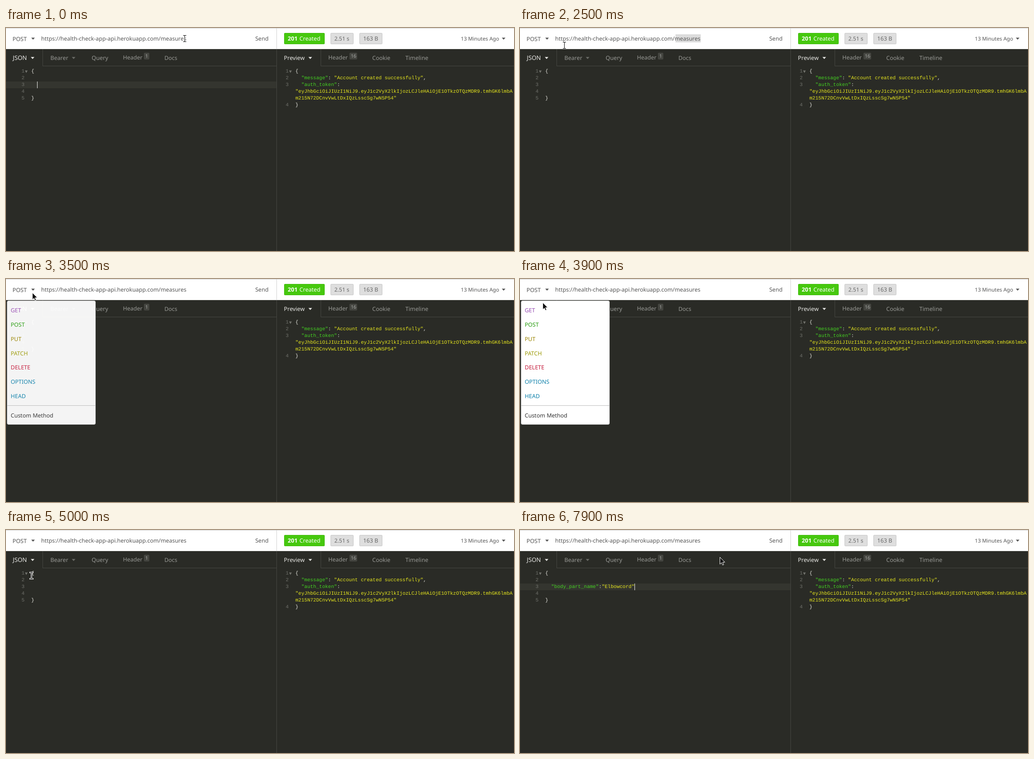
An HTML page with a canvas that plays this animation: 1127 by 496 pixels, repeating every 8 s.

```html
<!DOCTYPE html>
<html lang="en">
<head>
<meta charset="utf-8">
<title>API client</title>
<style>
html, body { margin: 0; width: 100%; height: 100%; overflow: hidden; background: #2a2b26; }
canvas { display: block; }
</style>
</head>
<body>
<canvas width="1127" height="496"></canvas>
<script>
const ctx = document.querySelector("canvas").getContext("2d");
ctx.textRendering = "geometricPrecision";

const SANS = '"Noto Sans", "Open Sans", sans-serif';
const MONO = '"Liberation Mono", "DejaVu Sans Mono", monospace';
const CHAR = 6.6, LOOP = 8000;
const BG = "#2a2b26", LINE = "#464742", GREY = "#999a96", LIGHT = "#e9e9e6", INK = "#555";
const KEY = "#44d022", STR = "#e6e61e", CODE = "#e6e6e0", NUM = "#70716b";

// Pointer positions: time, x, y, shape ("I" text beam, "A" arrow)
const pointer = [
  [0, 396, 23, "I"], [400, 405, 28, "I"], [1500, 394, 25, "I"], [1600, 374, 22, "I"],
  [1700, 362, 22, "I"], [1800, 353, 22, "I"], [2000, 345, 19, "I"],
  [2200, 328, 22, "I"], [2300, 260, 29, "I"], [2400, 170, 35, "I"],
  [2500, 98, 38, "I"], [2600, 62, 46, "A"], [2700, 64, 39, "A"], [2900, 58, 30, "A"],
  [3800, 56, 38, "A"], [3900, 50, 52, "A"], [4000, 46, 66, "A"], [4200, 43, 96, "A"],
  [4600, 43, 95, "I"], [5000, 56, 101, "I"], [5100, 80, 112, "I"], [5200, 100, 122, "I"],
  [5300, 108, 127, "I"], [7600, 291, 114, "I"], [7800, 400, 67, "A"], [7900, 443, 60, "A"]
];
// Left edge of the selection in the address: time, x
const selection = [[0, 401], [1500, 389], [1600, 376], [1700, 363], [1800, 345], [3200, 401]];

const methods = [
  ["GET", "#9347b0", 74], ["POST", "#259b0c", 106], ["PUT", "#9a8500", 138],
  ["PATCH", "#9c9a06", 170], ["DELETE", "#c4193a", 201], ["OPTIONS", "#0d80aa", 233],
  ["HEAD", "#0d80aa", 265], ["Custom Method", "#333", 308]
];

const at = (keys, t) => keys.findLast(k => k[0] <= t);
const within = (t, ...spans) => spans.some(([a, b]) => t >= a && t < b);

function rect(x, y, w, h, color) {
  ctx.fillStyle = color;
  ctx.fillRect(x, y, w, h);
}

function box(x, y, w, h, r, fill, stroke) {
  ctx.beginPath();
  ctx.roundRect(x, y, w, h, r);
  ctx.fillStyle = fill;
  ctx.fill();
  if (!stroke) return;
  ctx.strokeStyle = stroke;
  ctx.lineWidth = 1;
  ctx.stroke();
}

function text(s, x, y, color, size = 12.5, weight = 400) {
  ctx.font = `${weight} ${size}px ${SANS}`;
  ctx.fillStyle = color;
  ctx.fillText(s, x, y);
}

// Monospaced runs, given as string and colour in turn
function code(x, row, ...runs) {
  ctx.font = `11px ${MONO}`;
  for (let i = 0; i < runs.length; i += 2) {
    ctx.fillStyle = runs[i + 1];
    ctx.fillText(runs[i], x, 99 + row * 15);
    x += runs[i].length * CHAR;
  }
}

function poly(points, color) {
  ctx.beginPath();
  points.forEach(([x, y]) => ctx.lineTo(x, y));
  ctx.closePath();
  ctx.fillStyle = color;
  ctx.fill();
}

const drop = (x, y, color, w = 8, h = 4.5) => poly([[x, y], [x + w, y], [x + w / 2, y + h]], color);

function gutter(right, rows) {
  rows.forEach((row, i) => code(right - CHAR, row, String(i + 1), NUM));
  drop(right + 1, 94.5, "#73746e", 6, 5.5);
}

function badge(s, x, w) {
  box(x, 55, w, 15, 2, "#444540");
  text(s, x + 3, 66, "#aaaba7", 10.5);
}

function header(t) {
  rect(0, 0, 1127, 47, "#fff");
  rect(0, 0, 1127, 1, "#cfcfcf");
  rect(0, 46, 1127, 1, "#e4e4e3");
  if (within(t, [2600, 3500])) rect(0, 1, 75, 45, "#f0f0f0");
  text("POST", 14.5, 29, INK, 12.7);
  drop(56, 21.5, INK);

  const [, left] = at(selection, t);
  rect(left, 14, 401 - left, 18, "#dcdcdc");
  text("https://health-check-app-api.herokuapp.com/measures", 78, 28, INK, 12.43);
  if (within(t, [700, 1200])) rect(401, 14, 1, 18, "#333");
  if (within(t, [3200, 3400])) rect(78, 14, 1, 18, "#333");
  text("Send", 553, 28, INK);

  rect(600, 0, 1, 47, "#cfcfcf");
  box(617.5, 11.5, 89, 24, 1, "#46c80e", "#3fb90b");
  text("201", 625, 28, "#fff", 12.7, 700);
  text("Created", 651, 28, "#fff", 12.6);
  box(720.5, 11.5, 50, 24, 1, "#dedede", "#c6c6c6");
  text("2.51 s", 728.5, 28, "#666", 12.2);
  box(784.5, 11.5, 50, 24, 1, "#dedede", "#c6c6c6");
  text("163 B", 792.5, 28, "#666", 12.6);
  text("13 Minutes Ago", 1009, 28, INK, 11.6);
  drop(1100, 21.5, INK);
}

function tabs() {
  rect(600, 47, 1, 449, LINE);
  rect(81, 47, 1, 38, LINE);
  rect(81, 84, 519, 1, LINE);
  rect(698, 47, 1, 38, LINE);
  rect(698, 84, 429, 1, LINE);

  text("JSON", 15, 71, LIGHT, 13.3);
  drop(55, 64.5, LIGHT);
  text("Bearer", 98.5, 71, GREY, 12.6);
  drop(146, 64.5, "#6c6d68");
  text("Query", 190, 71, GREY, 12.7);
  text("Header", 259.5, 70, GREY);
  badge("1", 306, 12);
  text("Docs", 351.5, 71, GREY, 12.4);

  text("Preview", 616.5, 71, LIGHT, 12.7);
  drop(671, 64.5, LIGHT);
  text("Header", 715, 70, GREY);
  badge("16", 762, 17);
  text("Cookie", 812.5, 71, GREY);
  text("Timeline", 886, 71, GREY, 12.7);
}

function editor(t) {
  if (within(t, [0, 400], [5300, 5500], [6500, LOOP])) rect(0, 119, 600, 15, "#34352f");
  if (within(t, [5500, 6500])) rect(56, 119, 13, 15, "#4b4c46");
  gutter(41, [0, 1, 2, 3, 4]);
  code(56, 0, "{", CODE);
  if (t >= 6800) code(69.2, 2, '"body_part_name"', KEY, ":", CODE, '"Elbowcord"', STR);
  code(56, 4, "}", CODE);
  if (within(t, [0, 200], [5300, 5500], [6500, 6800])) rect(69, 119, 1, 15, "#f4f4f0");
  if (within(t, [6800, 7300], [7800, LOOP])) rect(254, 119, 1, 15, "#f4f4f0");
}

function response() {
  gutter(627, [0, 1, 2, 5]);
  code(642, 0, "{", CODE);
  code(655.2, 1, '"message"', KEY, ": ", CODE, '"Account created successfully"', STR, ",", CODE);
  code(655.2, 2, '"auth_token"', KEY, ":", CODE);
  code(642, 3, '"eyJhbGciOiJIUzI1NiJ9.eyJ1c2VyX2lkIjozLCJleHAiOjE1OTkzOTQzMDR9.tmhGK6lmbA', STR);
  code(642, 4, 'm215N72DCnvVwLtDxIQzLsscSg7wN5P54"', STR);
  code(642, 5, "}", CODE);
}

function menu(t) {
  if (!within(t, [3500, 4600])) return;
  ctx.globalAlpha = t < 3800 ? 0.95 : 1;
  box(2.5, 48.5, 196, 275, 3, "#fff", "#c4c4c4");
  if (t >= 4400) rect(3, 85, 195, 32, "#d1d1d1");
  rect(3, 281, 195, 1, "#bbb");
  for (const [name, color, y] of methods) text(name, 10.5, y, color, 12.5);
  ctx.globalAlpha = 1;
}

function cursor(t) {
  const [, x, y, shape] = at(pointer, t);
  ctx.save();
  ctx.translate(x + 0.5, y + 0.5);
  ctx.beginPath();
  if (shape === "I") {
    ctx.moveTo(-3, -7);
    ctx.lineTo(3, -7);
    ctx.moveTo(-3, 7);
    ctx.lineTo(3, 7);
    ctx.moveTo(0, -7);
    ctx.lineTo(0, 7);
    ctx.lineCap = "square";
    for (const [color, width] of [["#fff", 3], ["#000", 1]]) {
      ctx.strokeStyle = color;
      ctx.lineWidth = width;
      ctx.stroke();
    }
  } else {
    const tip = [[0, 0], [0, 15.5], [3.6, 12.2], [6, 17.5], [8.5, 16.5], [6.2, 11.2], [11, 11.2]];
    poly(tip, "#111");
    ctx.strokeStyle = "#fff";
    ctx.lineWidth = 1;
    ctx.stroke();
  }
  ctx.restore();
}

function frame(now) {
  const t = now % LOOP;
  rect(0, 0, 1127, 496, BG);
  header(t);
  tabs();
  editor(t);
  response();
  menu(t);
  cursor(t);
  requestAnimationFrame(frame);
}
requestAnimationFrame(frame);
</script>
</body>
</html>
```
